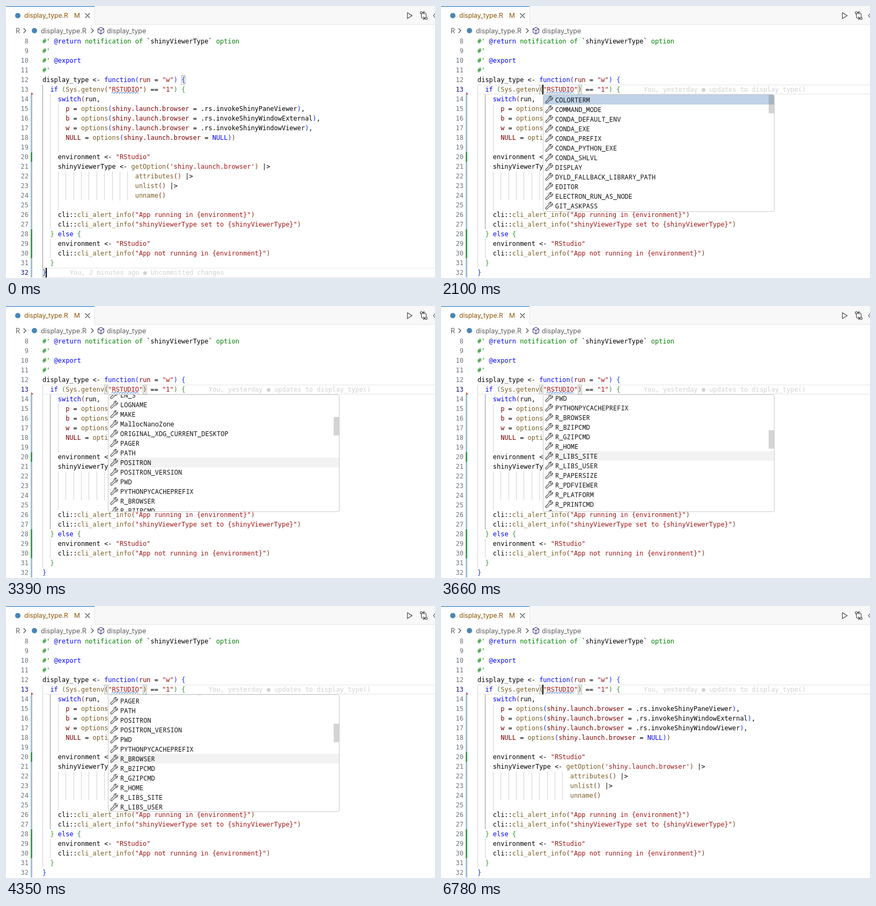
Write an HTML page that moves like this. It is 800 px wide and 508 px high and loops after 6840 ms.

```html
<!DOCTYPE html>
<html lang="en">
<head>
<meta charset="utf-8">
<title>Editor completion list</title>
<style>
html, body { margin: 0; width: 100%; height: 100%; overflow: hidden; background: #fff; }
svg { display: block; }
text { white-space: pre; }
.code text { font: 11.96px "DejaVu Sans Mono", "Liberation Mono", monospace; }
.list text { font: 12px "Noto Sans Mono", "DejaVu Sans Mono", monospace; fill: #111; }
.ui text { font: 12.6px Inter, Roboto, sans-serif; fill: #616161; }
.ui .tab { font-size: 12.1px; fill: #895503; }
.icon { fill: none; stroke: #424242; stroke-width: 1.1; stroke-linejoin: round; stroke-linecap: round; }
.blame { fill: #d2d2d2; }
.match { fill: rgba(0,100,0,.08); stroke: #b9b9b9; }
</style>
</head>
<body>
<svg id="stage" width="800" height="508" viewBox="0 0 800 508"></svg>
<script>
(() => {
const LOOP = 6840, LEFT = 68, CELL = 7.2, ROW = 18, FIRST = 8;
const POPUP = { x: 190.5, y: 165.5, w: 431, h: 218.5 };

const lines = `#' @return notification of \`shinyViewerType\` option
#'
#' @export
#'
display_type <- function(run = "w") {
  if (Sys.getenv("RSTUDIO") == "1") {
    switch(run,
      p = options(shiny.launch.browser = .rs.invokeShinyPaneViewer),
      b = options(shiny.launch.browser = .rs.invokeShinyWindowExternal),
      w = options(shiny.launch.browser = .rs.invokeShinyWindowViewer),
      NULL = options(shiny.launch.browser = NULL))

    environment <- "RStudio"
    shinyViewerType <- getOption('shiny.launch.browser') |>
                        attributes() |>
                        unlist() |>
                        unname()

    cli::cli_alert_info("App running in {environment}")
    cli::cli_alert_info("shinyViewerType set to {shinyViewerType}")
  } else {
    environment <- "RStudio"
    cli::cli_alert_info("App not running in {environment}")
  }
}`.split("\n");

const variables = `COLORTERM COMMAND_MODE CONDA_DEFAULT_ENV CONDA_EXE CONDA_PREFIX CONDA_PYTHON_EXE
CONDA_SHLVL DISPLAY DYLD_FALLBACK_LIBRARY_PATH EDITOR ELECTRON_RUN_AS_NODE GIT_ASKPASS HOME LANG LN_S
LOGNAME MAKE MallocNanoZone ORIGINAL_XDG_CURRENT_DESKTOP PAGER PATH POSITRON POSITRON_VERSION PWD
PYTHONPYCACHEPREFIX R_BROWSER R_BZIPCMD R_GZIPCMD R_HOME R_LIBS_SITE R_LIBS_USER R_PAPERSIZE
R_PDFVIEWER R_PLATFORM R_PRINTCMD R_RD4PDF R_SESSION_TMPDIR R_SHARE_DIR`.split(/\s+/);

const scrollKeys = [[3030, 0], [3150, 65], [3300, 190], [3480, 330], [3660, 417],
  [3930, 417], [4080, 395], [4350, 340], [4530, 314]];
const pointerKeys = [[4680, 285], [4860, 239]];

const safe = s => s.replace(/&/g, "&amp;").replace(/</g, "&lt;");
const span = (s, color) => `<tspan fill="${color}">${safe(s)}</tspan>`;
const text = (x, y, body, attrs = "") => `<text x="${x}" y="${y}" ${attrs}>${body}</text>`;
const rect = (x, y, w, h, attrs) => `<rect x="${x}" y="${y}" width="${w}" height="${h}" ${attrs}/>`;
const path = (d, attrs = 'class="icon"') => `<path d="${d}" ${attrs}/>`;
const lineTop = n => 57 + (n - FIRST) * ROW;
const baseline = n => lineTop(n) + 13;
const col = n => LEFT + n * CELL;

let depth = 0;
function bracket(ch) {
  const level = "({".includes(ch) ? depth++ : --depth;
  return span(ch, ["#0431fa", "#319331", "#7b3814"][level % 3]);
}

function highlight(line) {
  if (line.startsWith("#"))
    return line.split(/(@\w+|`\w+`)/).map(s =>
      span(s, s[0] === "@" ? "#0000ff" : s[0] === "`" ? "#000" : "#008000")).join("");
  const token = /("[^"]*"|'[^']*')|([\w.]+)(?= = )|(function|if|else|switch|NULL)\b|([\w.]+)(?=\()|([(){}])|[\w.]+|[^]/g;
  return line.replace(token, (all, string, arg, keyword, call, mark) =>
    string ? span(all, "#a31515") : arg ? span(all, "#800000") : keyword ? span(all, "#0000ff") :
    call ? span(all, "#795e26") : mark ? bracket(mark) : safe(all));
}

const guide = (n, from, to, id = "") =>
  rect(Math.round(col(n)), lineTop(from), 1, (to - from + 1) * ROW, `fill="#d3d3d3" ${id}`);

function guides() {
  let out = guide(0, 13, 31, 'id="outer"') + guide(2, 14, 27, 'id="inner"') + guide(2, 29, 30) +
    guide(4, 15, 19) + guide(4, 22, 25);
  for (let n = 6; n <= 22; n += 2) out += guide(n, 22, 24);
  return out;
}

function gutter() {
  const bar = (from, to, fill) => rect(46, lineTop(from), 3, (to - from + 1) * ROW, `fill="${fill}"`);
  const added = "#3f9e56", changed = "url(#hatch)";
  return bar(14, 19, changed) + bar(20, 20, added) + bar(21, 27, changed) +
    bar(28, 30, added) + bar(31, 32, changed) + path("M47 161 L51 164.5 L47 166 Z", 'fill="#c74e39"');
}

function squiggle() {
  let d = "M197 163";
  for (let x = 197; x < 247; x += 5) d += " q1.25 -3 2.5 -1.5 t2.5 1.5";
  return path(d, 'fill="none" stroke="#316bcd"');
}

const lineFrame = n => [0, 17].map(dy =>
  rect(LEFT, lineTop(n) + dy, 732, 1, 'fill="#e6e6e6"')).join("");
const matchBox = (n, line) => rect(col(n) + .3, lineTop(line) + .5, 6.7, 17, 'class="match"');
const chevron = (x, y) => path(`M${x} ${y - 4} l4 4 l-4 4`);
const dot = (x, y) => `<circle cx="${x}" cy="${y}" r="5" fill="#4b86b4"/>`;

const header = `<g class="ui">
  ${rect(0, 0, 800, 34, 'fill="#f8f8f8"')}${rect(0, 34, 800, 1, 'fill="#e5e5e5"')}
  ${rect(0, 0, 165, 35, 'fill="#fff"')}${rect(165, 0, 1, 35, 'fill="#e5e5e5"')}
  ${rect(0, 0, 165, 1, 'fill="#005fb8"')}
  ${dot(22, 18)}${text(34, 22, "display_type.R", 'class="tab"')}${text(127, 22, "M", 'class="tab"')}
  ${path("M148 14 l8 8 m0 -8 l-8 8")}
  ${path("M748.5 12.5 v11 l9 -5.5 z")}
  ${path("M774.5 14.5 v4.5 q0 4 4 4 h2 m-2 -2.5 l2.5 2.5 l-2.5 2.5 M783.5 21 v-4.5 q0 -4 -4 -4 h-2 m2.5 -2.5 l-2.5 2.5 l2.5 2.5")}
  <circle class="icon" cx="774.5" cy="12.5" r="2"/><circle class="icon" cx="783.5" cy="23" r="2"/>
  ${path("M800 14.5 l-3 3.5 l3 3.5")}
  ${text(18, 51, "R")}${chevron(33, 46)}${dot(53, 46)}
  ${text(65, 51, "display_type.R")}${chevron(159, 46)}
  ${path("M177 40 l5.5 2.8 v6.4 l-5.5 3 l-5.5 -3 v-6.4 z m-5.5 2.8 l5.5 3 l5.5 -3 m-5.5 3 v6.4", 'class="icon" style="stroke:#4b3d7d"')}
  ${text(188, 51, "display_type")}
</g>`;

const code = `<g class="code">
  ${guides()}${gutter()}
  <g id="before">${lineFrame(32)}${matchBox(36, 12)}${matchBox(0, 32)}
    ${text(119, baseline(32), "You, 2 minutes ago ● Uncommitted changes", 'class="blame"')}</g>
  <g id="after">${lineFrame(13)}${matchBox(16, 13)}${matchBox(26, 13)}</g>
  ${text(378, baseline(13), "You, yesterday ● updates to display_type()", 'class="blame" id="blame"')}
  ${lines.map((line, i) => {
    const n = i + FIRST;
    return text(42, baseline(n), n, `text-anchor="end" fill="#6e7681" id="n${n}"`) +
      text(LEFT, baseline(n), highlight(line));
  }).join("")}
  ${squiggle()}
  ${rect(0, 0, 2, 18, 'id="caret"')}
</g>`;

const wrench = y => path(`M195.5 ${y + 4} l5.8 -5.8 a3.6 3.6 0 0 1 4.6 -4.6 l-2.3 2.4 l.4 1.8 l1.8 .4 l2.3 -2.3
  a3.6 3.6 0 0 1 -4.6 4.5 l-5.8 5.8 a1.5 1.5 0 0 1 -2.2 -2.2 z`);

const popup = `<g class="list" id="popup">
  ${rect(POPUP.x, POPUP.y, POPUP.w, POPUP.h, 'rx="3" fill="#fff"')}
  <g clip-path="url(#view)">
    <g id="rows">
      ${rect(191, 166, 430, ROW, 'fill="#bfd2e7"')}
      ${rect(191, 0, 430, ROW, 'fill="#f2f2f2" id="hover"')}
      ${variables.map((name, i) => wrench(175 + i * ROW) + text(213, 179.5 + i * ROW, name)).join("")}
    </g>
    ${rect(611, 0, 10, 34.5, 'fill="rgba(100,100,100,.28)" id="thumb"')}
  </g>
  ${rect(POPUP.x, POPUP.y, POPUP.w, POPUP.h, 'rx="3" fill="none" stroke="#c8c8c8"')}
</g>`;

document.getElementById("stage").innerHTML = `<defs>
  <pattern id="hatch" width="3" height="3" patternUnits="userSpaceOnUse">
    <rect width="3" height="3" fill="#fff"/><path d="M-1 1 l2 -2 M0 3 l3 -3 M2 4 l2 -2" stroke="#3f83b5" stroke-width="1.1"/>
  </pattern>
  <clipPath id="view">${rect(191, 166, 430, 217.5, "")}</clipPath>
</defs>${rect(0, 0, 800, 508, 'fill="#fff"')}${header}${code}${popup}`;

const el = id => document.getElementById(id);
const show = (id, on) => el(id).setAttribute("visibility", on ? "visible" : "hidden");
const paint = (id, color) => el(id).setAttribute("fill", color);

function track(keys, t) {
  if (t <= keys[0][0]) return keys[0][1];
  for (let i = 1; i < keys.length; i++) {
    const [t0, a] = keys[i - 1], [t1, b] = keys[i];
    if (t < t1) return a + (b - a) * (t - t0) / (t1 - t0);
  }
  return keys[keys.length - 1][1];
}

function caretVisible(t) {
  if (t < 855) return true;
  if (t > 3585 && t < 3690) return false; // one late blink
  return Math.floor((t - 855) / 390) % 2 === 1;
}

function render(t) {
  const clicked = t >= 120, popupOpen = t >= 1470 && t < 6510;
  show("before", !clicked);
  show("after", clicked);
  show("blame", t >= 480);
  paint("n32", clicked ? "#6e7681" : "#171184");
  paint("n13", clicked ? "#171184" : "#6e7681");
  paint("outer", clicked ? "#d3d3d3" : "#939393");
  paint("inner", clicked ? "#939393" : "#d3d3d3");

  el("caret").setAttribute("x", clicked ? 189 : 74);
  el("caret").setAttribute("y", lineTop(clicked ? 13 : 32));
  show("caret", caretVisible(t));

  el("popup").setAttribute("display", popupOpen ? "inline" : "none");
  const scroll = track(scrollKeys, t);
  const row = Math.floor((track(pointerKeys, t) - 166 + scroll) / ROW);
  el("rows").setAttribute("transform", `translate(0 ${-scroll})`);
  el("hover").setAttribute("y", 166 + row * ROW);
  show("hover", t >= 2520);
  el("thumb").setAttribute("y", 166 + scroll / 6.32);
}

const start = performance.now();
function tick() {
  render((performance.now() - start) % LOOP);
  requestAnimationFrame(tick);
}
render(0);
requestAnimationFrame(tick);
})();
</script>
</body>
</html>
```
